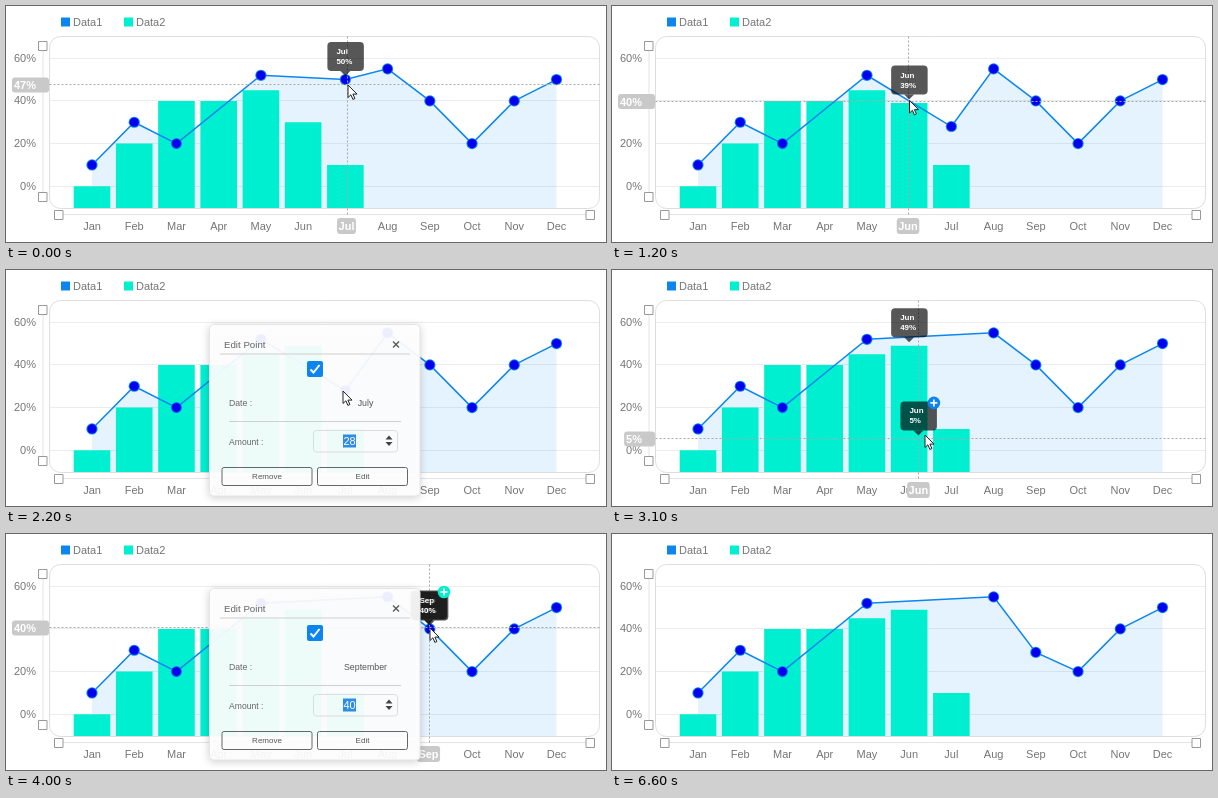
Write an HTML page with a canvas that moves like this. It is 600 px wide and 236 px high and loops after 7000 ms.

```html
<!DOCTYPE html>
<html lang="en">
<head>
<meta charset="utf-8">
<title>Editable chart</title>
<style>
html, body { margin: 0; width: 100%; height: 100%; overflow: hidden; background: #fff; }
canvas { display: block; width: 600px; height: 236px; }
</style>
</head>
<body>
<canvas id="stage"></canvas>
<script>
const W = 600, H = 236, LOOP = 7000, STEP = 100;
const BLUE = '#0c86ee', TEAL = '#00efd1', GRAY = '#757575', BADGE = '#c9c9c9';
const PLOT = { left: 43.5, top: 30.5, right: 593.5, bottom: 202.5 };
const MONTHS = ['Jan', 'Feb', 'Mar', 'Apr', 'May', 'Jun', 'Jul', 'Aug', 'Sep', 'Oct', 'Nov', 'Dec'];
const JUN = 5, JUL = 6, SEP = 8;

const canvas = document.getElementById('stage');
const ctx = canvas.getContext('2d');
const dpr = window.devicePixelRatio || 1;
canvas.width = W * dpr;
canvas.height = H * dpr;

const xOf = i => 86 + i * 42.23;
const yOf = v => 180.3 - v * 2.135;
const valueAt = y => Math.round((180.3 - y) / 2.135);
const monthAt = x => Math.max(0, Math.min(11, Math.round((x - 86) / 42.23)));
const within = (t, a, b) => t >= a && t < b;

// Cursor path: time, x, y
const PATH = [
  [0, 342, 79], [500, 341, 119], [800, 298, 115], [1200, 297.5, 94.5], [1500, 297.5, 75],
  [1800, 338, 119], [2000, 337, 121], [2300, 337, 121], [2700, 262, 204], [2900, 262, 204],
  [3100, 313, 165], [3300, 368, 118], [3600, 424, 94], [4100, 424, 94], [4600, 380, 174],
  [5400, 380, 174], [5700, 318, 202]
];

// Linear track through keys [time, value, ...]
function track(keys, t, k = 1) {
  if (t <= keys[0][0]) return keys[0][k];
  for (let i = 1; i < keys.length; i++) {
    const a = keys[i - 1], b = keys[i];
    if (t < b[0]) return a[k] + (b[k] - a[k]) * (t - a[0]) / (b[0] - a[0]);
  }
  return keys[keys.length - 1][k];
}

function text(str, x, y, size, color, align = 'left', weight = '') {
  ctx.font = `${weight} ${size}px "Liberation Sans", Arial, sans-serif`;
  ctx.fillStyle = color;
  ctx.textAlign = align;
  ctx.fillText(str, x, y);
}

function box(x, y, w, h, r, fill, stroke) {
  ctx.beginPath();
  ctx.roundRect(x, y, w, h, r);
  if (fill) { ctx.fillStyle = fill; ctx.fill(); }
  if (stroke) { ctx.strokeStyle = stroke; ctx.lineWidth = 1; ctx.stroke(); }
}

function line(points, color, width = 1) {
  ctx.beginPath();
  points.forEach(([x, y]) => ctx.lineTo(x, y));
  ctx.strokeStyle = color;
  ctx.lineWidth = width;
  ctx.stroke();
}

function polygon(points, fill) {
  ctx.beginPath();
  points.forEach(([x, y]) => ctx.lineTo(x, y));
  ctx.closePath();
  ctx.fillStyle = fill;
  ctx.fill();
}

function disc(x, y, r, fill) {
  ctx.beginPath();
  ctx.arc(x, y, r, 0, Math.PI * 2);
  ctx.fillStyle = fill;
  ctx.fill();
}

function stateAt(t) {
  const jul = t < 2800 ? Math.round(track([[0, 50], [500, 28]], t)) : null;
  const jun = Math.round(track([[800, 30], [1200, 39], [1500, 49]], t));
  return {
    points: [10, 30, 20, null, 52, null, jul, 55, t < 5800 ? 40 : 29, 20, 40, 50],
    bars: [0, 20, 40, 40, 45, jun, 10],
    dragging: t < 500 ? JUL : within(t, 800, 1600) ? JUN : -1
  };
}

function drawFrame() {
  box(55, 11.5, 9, 9, 0, BLUE);
  text('Data1', 67, 20, 11, GRAY);
  box(118, 11.5, 9, 9, 0, TEAL);
  text('Data2', 130, 20, 11, GRAY);
  for (const v of [0, 20, 40, 60]) {
    const y = Math.floor(yOf(v)) + 0.5;
    line([[PLOT.left, y], [PLOT.right, y]], '#ececec');
    text(v + '%', 30, y + 3.5, 11, GRAY, 'right');
  }
  MONTHS.forEach((m, i) => text(m, xOf(i), 224, 11, GRAY, 'center'));
  box(PLOT.left, PLOT.top, PLOT.right - PLOT.left, PLOT.bottom - PLOT.top, 11, null, '#dedede');
  line([[37, 40], [37, 191]], '#e4e4e4');
  line([[52, 208.5], [584, 208.5]], '#e4e4e4');
  for (const [x, y] of [[32, 35.5], [32, 186.5], [48, 204.5], [579.5, 204.5]]) {
    box(x + 0.5, y, 8.5, 9, 0, '#fff', '#999');
  }
}

function drawSeries({ points, bars }) {
  const dots = points.map((v, i) => v === null ? null : [xOf(i), yOf(v)]).filter(Boolean);
  polygon([[xOf(0), 202], ...dots, [xOf(11), 202]], 'rgba(0,136,238,0.1)');
  bars.forEach((v, i) => box(xOf(i) - 18.3, yOf(v), 36.6, 202 - yOf(v), 0, TEAL));
  line(dots, BLUE, 1.5);
  for (const [x, y] of dots) {
    disc(x, y, 5.6, BLUE);
    disc(x, y, 4.6, '#0000ee');
  }
}

function tooltip(x, y, month, value) {
  const fill = 'rgba(0,0,0,0.66)';
  box(x - 18, y - 37.5, 36.5, 29, 4, fill);
  polygon([[x - 5, y - 8.5], [x + 5, y - 8.5], [x, y - 3.5]], fill);
  text(MONTHS[month], x - 9, y - 25.5, 8, '#fff', 'left', 'bold');
  text(value + '%', x - 9, y - 15.5, 8, '#fff', 'left', 'bold');
}

function addTooltip(x, y, month, color) {
  tooltip(x, y, month, valueAt(y));
  const px = x + 15.5, py = y - 36;
  disc(px, py, 6.3, color);
  line([[px - 3.5, py], [px + 3.5, py]], '#fff', 1.6);
  line([[px, py - 3.5], [px, py + 3.5]], '#fff', 1.6);
}

function drawCrosshair(x, y) {
  ctx.setLineDash([2, 2]);
  const cx = Math.round(x) + 0.5, cy = Math.round(y) - 0.5;
  line([[PLOT.left, cy], [PLOT.right, cy]], '#a8a8a8');
  line([[cx, PLOT.top], [cx, 210]], '#a8a8a8');
  ctx.setLineDash([]);

  const percent = valueAt(y) + '%', month = MONTHS[monthAt(x)];
  ctx.font = 'bold 11px "Liberation Sans", Arial, sans-serif';
  const pw = ctx.measureText(percent).width + 15, mw = ctx.measureText(month).width + 3;
  box(43 - pw, y - 7.5, pw, 15, 3, BADGE);
  text(percent, 30, y + 4, 11, '#fff', 'right', 'bold');
  box(x - mw / 2, 212, mw, 16, 3, BADGE);
  text(month, x, 224, 11, '#fff', 'center', 'bold');
}

function drawHover(t, state) {
  if (!(t < 2100 || within(t, 3000, 4100))) return;
  const x = track(PATH, t - 20, 1) - 1.5, y = track(PATH, t - 20, 2);
  if (y > PLOT.bottom) return;
  drawCrosshair(x, y);

  const month = state.dragging < 0 ? monthAt(x) : state.dragging;
  const point = state.points[month], bar = state.bars[month];
  const value = point ?? bar;
  if (value !== undefined) tooltip(xOf(month), yOf(value), month, value);
  if (state.dragging < 0) {
    if (point === null) addTooltip(x, y, month, BLUE);
    else if (bar === undefined) addTooltip(x, y, month, TEAL);
  }
}

function drawSpinner(active) {
  if (active) box(377, 163, 12, 16, 1, '#d6d6d6');
  polygon([[379.5, 169.5], [386.5, 169.5], [383, 165.5]], '#444');
  polygon([[379.5, 172], [386.5, 172], [383, 176]], '#444');
}

function drawDialog(t, alpha) {
  const first = t < 3500, selected = t < 4800;
  const amount = first ? 28 : selected ? 40 : t < 5000 ? 39 : Math.max(29, 38 - (t - 5000) / 50);
  ctx.save();
  ctx.globalAlpha = alpha;
  ctx.shadowColor = 'rgba(0,0,0,0.2)';
  ctx.shadowBlur = 9;
  ctx.shadowOffsetY = 2;
  box(203, 54, 211, 172, 4, 'rgba(255,255,255,0.93)');
  ctx.shadowColor = 'transparent';
  box(203.5, 54.5, 210.5, 171.5, 4, null, '#e4e4e4');

  text('Edit Point', 218, 77.5, 9.7, '#666');
  line([[387, 71.5], [393, 77.5]], '#555', 1.3);
  line([[393, 71.5], [387, 77.5]], '#555', 1.3);
  line([[214, 84], [404, 84]], '#cfcfcf');
  box(301, 91, 16, 16, 2, BLUE);
  line([[304.5, 99.5], [307.5, 102.5], [313.5, 95]], '#fff', 2);

  text('Date :', 223, 135.5, 8.7, '#666');
  text(first ? 'July' : 'September', 359.5, 135.5, 8.8, '#555', 'center');
  line([[223, 151.5], [395, 151.5]], '#cfcfcf');
  text('Amount :', 223, 174.5, 8.6, '#666');

  box(307.5, 160.5, 84, 21.5, 3, null, '#dcdcdc');
  if (selected) box(337, 164.5, 13, 13, 0, '#2f8be6');
  text(String(amount), 343.5, 175, 11, selected ? '#fff' : '#666', 'center');
  if (!selected) line([[350.5, 165], [350.5, 177]], '#666');
  drawSpinner(within(t, 4800, 5500));

  box(216, 197.5, 90, 18, 2, null, '#666');
  text('Remove', 261, 209, 8, '#555', 'center');
  box(311.5, 197.5, 90, 18, 2, null, '#666');
  text('Edit', 356.5, 209, 8, '#555', 'center');
  ctx.restore();
}

function drawCursor(x, y, alpha) {
  const shape = [[0, 0], [0, 12.5], [2.9, 9.8], [4.9, 14.4], [6.9, 13.5], [4.9, 9.1], [9, 9.1], [0, 0]];
  const outline = shape.map(([dx, dy]) => [x + dx, y + dy]);
  ctx.save();
  ctx.globalAlpha = alpha;
  polygon(outline, '#fff');
  line(outline, '#222');
  ctx.restore();
}

function render(t) {
  ctx.setTransform(dpr, 0, 0, dpr, 0, 0);
  ctx.fillStyle = '#fff';
  ctx.fillRect(0, 0, W, H);
  const state = stateAt(t);
  drawFrame();
  drawSeries(state);
  drawHover(t, state);

  const dialog = track([
    [1800, 0], [2000, 1], [2800, 1], [3000, 0],
    [3700, 0], [3900, 1], [5700, 1], [6300, 0]
  ], t);
  if (dialog > 0) drawDialog(t, dialog);
  const cursor = t < 5700 ? 1 : dialog;
  if (cursor > 0) drawCursor(track(PATH, t, 1), track(PATH, t, 2), cursor);
}

const start = performance.now();
function tick() {
  const t = (performance.now() - start) % LOOP;
  render(Math.min(6600, Math.floor(t / STEP) * STEP));
  requestAnimationFrame(tick);
}
tick();
</script>
</body>
</html>
```
